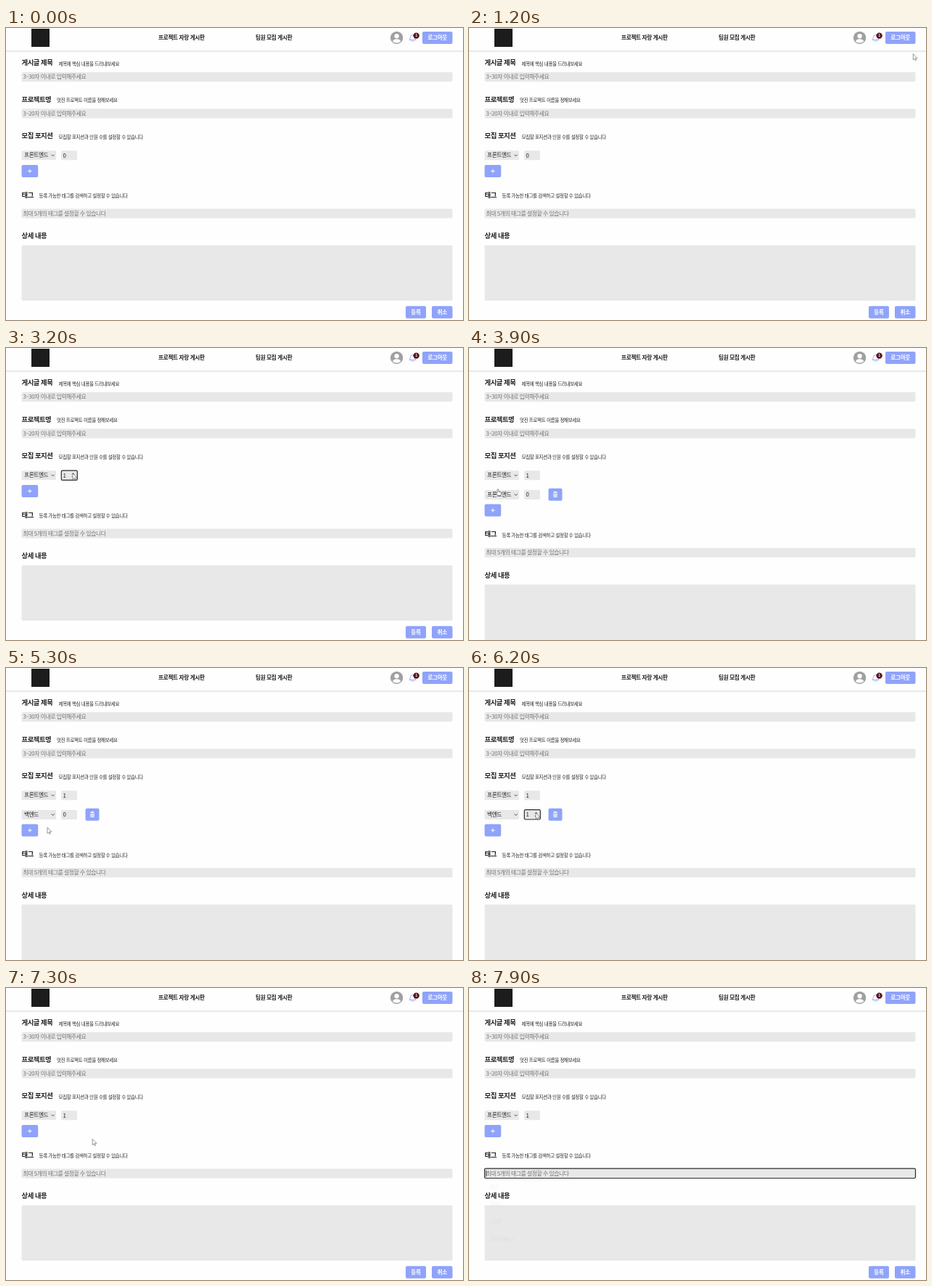
An HTML page that plays this animation: 630x403 px, repeating every 8 s.

```html
<!DOCTYPE html>
<html lang="ko">
<head>
<meta charset="utf-8">
<style>
  html, body { margin: 0; height: 100%; overflow: hidden; background: #fefefe; }
  svg { display: block; width: 100vw; height: 100vh; }
  text { font-family: "Noto Sans CJK KR", "Noto Sans CJK", sans-serif; letter-spacing: -.05em; fill: #222; white-space: pre; }
  .bold { font-weight: 700; }
  .hint { fill: #757575; }
  .white { fill: #fff; }
  .field { fill: #e8e8e8; }
  .button { fill: #8fa3fa; }
  .focus { fill: none; stroke: #2b2b2b; stroke-width: 1.2; }
  .line { fill: none; stroke: #333; stroke-width: .9; }
  .icon { fill: none; stroke: #fff; stroke-width: 1; }
  .pointer { fill: #fff; stroke: #555; stroke-width: .6; stroke-linejoin: round; }
</style>
</head>
<body>
<svg id="stage" viewBox="0 0 630 403"></svg>
<script>
const LOOP = 8000, STEP = 100, ROW = 26.6;
const stage = document.getElementById('stage');

// Text is placed by its left edge and vertical centre.
const text = (x, cy, size, str, cls = '') =>
  `<text x="${x}" y="${cy + size * .35}" font-size="${size}" class="${cls}">${str}</text>`;
const box = (x, y, w, h, cls = 'field', r = 1.5) =>
  `<rect x="${x}" y="${y}" width="${w}" height="${h}" rx="${r}" class="${cls}"/>`;
const path = (d, cls) => `<path d="${d}" class="${cls}"/>`;
const group = (id, content) => `<g id="${id}">${content}</g>`;

const heading = (cy, title, hintX, hint) =>
  text(21.5, cy, 9.4, title, 'bold') + (hint ? text(hintX, cy + 1.7, 6.5, hint) : '');
const input = (y, placeholder) =>
  box(21.5, y, 594, 13) + text(23.5, y + 6.5, 7.75, placeholder, 'hint');
const button = (x, y, w, label, labelX) =>
  box(x, y, w, 17, 'button', 2) + text(labelX, y + 8.6, 7.7, label, 'bold white');

const positionRow = (id, y) => group(id,
  box(21.5, y, 47.5, 13) +
  `<g id="${id}Role">${text(25, y + 6.5, 7.65, '프론트엔드')}</g>` +
  path(`M62.6 ${y + 5.5}l2 2 2-2`, 'line') +
  box(76, y, 22, 13) +
  `<g id="${id}Count">${text(78.5, y + 6.5, 7.9, '0')}</g>` +
  group(id + 'Focus', box(76.3, y - .2, 22, 13.3, 'focus') +
    path(`M91 ${y + 5}l1.5-1.6 1.5 1.6M91 ${y + 8}l1.5 1.6 1.5-1.6`, 'line')));

const trash = group('trash', box(109.5, 193.7, 19, 17, 'button', 2) +
  path('M116.2 199.6h5.6M118 199.3v-1h2v1M116.9 200.8v4.7h4.2v-4.7M118.3 201.3v3M119.7 201.3v3', 'icon'));

const header =
  `<linearGradient id="shade" x2="0" y2="1"><stop stop-color="#e0e0e0"/><stop offset="1" stop-color="#fefefe"/></linearGradient>
   <rect y="31" width="630" height="3" fill="url(#shade)"/>
   <rect x="35" y="1" width="25" height="25" fill="#1c1c1c"/>` +
  text(210, 13.5, 7.7, '프로젝트 자랑 게시판', 'bold') +
  text(344, 13.5, 7.7, '팀원 모집 게시판', 'bold') +
  `<circle cx="538.6" cy="13.4" r="8.7" fill="#a0a0a0"/>
   <circle cx="538.6" cy="11.2" r="3.1" fill="#fff"/>
   <path d="M533 18.4q1-3.2 5.6-3.2t5.6 3.2q-5.6 4.4-11.2 0" fill="#fff"/>
   <path d="M556 16.5q1.5-1 1.5-4 0-3 3-3t3 3q0 3 1.5 4zM559 17.8q1.5 1.4 3 0" fill="none" stroke="#8fa3fa" stroke-width=".9"/>
   <circle cx="565.6" cy="10.6" r="4.2" fill="#5c1018"/>` +
  text(564.3, 10.6, 5.2, '1', 'bold white') +
  button(574, 5, 41.5, '로그아웃', 581.3);

const lowerForm = group('lower',
  box(21.5, 189, 22.7, 17, 'button', 2) + path('M30.2 197.5h5.4M32.9 194.8v5.4', 'icon') +
  heading(230.3, '태그', 45.5, '등록 가능한 태그를 검색하고 설정할 수 있습니다') +
  input(249.4, '최대 5개의 태그를 설정할 수 있습니다') +
  heading(287, '상세 내용') +
  box(21.5, 300, 594, 76.3) +
  button(551, 383.8, 28, '등록', 558.3) + button(587, 383.8, 28.5, '취소', 594.5));

const suggestions = ['태그', '프론트', '디자인', '데이터베이스']
  .map((name, i) => text(29, 274.5 + i * 24, 6.5, name)).join('');

stage.innerHTML = header +
  heading(48, '게시글 제목', 72.5, '제목에 핵심 내용을 드러내보세요') +
  input(60.9, '3~30자 이내로 입력해주세요') +
  heading(98.5, '프로젝트명', 70, '멋진 프로젝트 이름을 정해보세요') +
  input(111.6, '3~20자 이내로 입력해주세요') +
  heading(149.2, '모집 포지션', 72.5, '모집할 포지션과 인원 수를 설정할 수 있습니다') +
  positionRow('first', 169.3) +
  group('extra', positionRow('second', 169.3 + ROW) + trash) +
  lowerForm +
  group('tagFocus', box(21.5, 249.2, 594, 13.3, 'focus') + path('M23.6 251.5v9', 'line')) +
  `<g id="suggestions" opacity=".05">${suggestions}</g>` +
  group('cursor',
    group('arrow', path('M0 0v8.2l1.9-1.7 1.3 2.8 1.3-.6-1.3-2.7h2.6z', 'pointer')) +
    group('hand', path('M-.8 0q.8-1 1.6 0v3.2l3 .8q.8.3.6 1.2l-.6 3.3h-4l-2.8-3.7q.4-1.3 2.2.2z', 'pointer')));

const el = id => document.getElementById(id);
const show = (id, on) => { el(id).style.display = on ? '' : 'none'; };
const setLabel = (id, value) => { el(id).firstChild.textContent = value; };
const between = (t, from, to) => t >= from && t < to;

// [time, x, y] of the pointer tip
const route = [
  [1100, 632, 30], [2000, 57, 196], [2500, 92, 173], [3200, 92, 173],
  [3600, 36, 198], [3700, 36, 198], [3900, 40, 195], [4500, 40, 201],
  [5200, 40, 201], [5300, 57, 220], [5800, 92, 200], [6300, 92, 200],
  [6800, 126, 203], [7200, 126, 203], [7700, 60, 255]
];

function pointerAt(t) {
  const next = route.findIndex(stop => stop[0] > t);
  if (next < 1) return null;
  const [t0, x0, y0] = route[next - 1], [t1, x1, y1] = route[next];
  const p = (t - t0) / (t1 - t0), eased = p * p * (3 - 2 * p);
  return [x0 + (x1 - x0) * eased, y0 + (y1 - y0) * eased];
}

function draw(now) {
  const t = Math.floor(now % LOOP / STEP) * STEP;
  const expanded = between(t, 3700, 7000);

  show('extra', expanded);
  el('lower').setAttribute('transform', `translate(0 ${expanded ? ROW : 0})`);
  setLabel('firstCount', t >= 3000 ? 1 : 0);
  setLabel('secondCount', t >= 6100 ? 1 : 0);
  setLabel('secondRole', t >= 5300 ? '백엔드' : '프론트엔드');
  show('firstFocus', between(t, 2800, 3700));
  show('secondFocus', t >= 5900);
  el('trash').setAttribute('opacity', t >= 6700 ? .65 : 1);
  show('tagFocus', t >= 7700);
  show('suggestions', t >= 7900);

  const tip = pointerAt(t);
  show('cursor', tip);
  if (tip) {
    const onButton = between(t, 3600, 4600) || between(t, 6700, 7300);
    el('cursor').setAttribute('transform', `translate(${tip})`);
    show('arrow', !onButton);
    show('hand', onButton);
  }
  requestAnimationFrame(draw);
}
requestAnimationFrame(draw);
</script>
</body>
</html>
```
